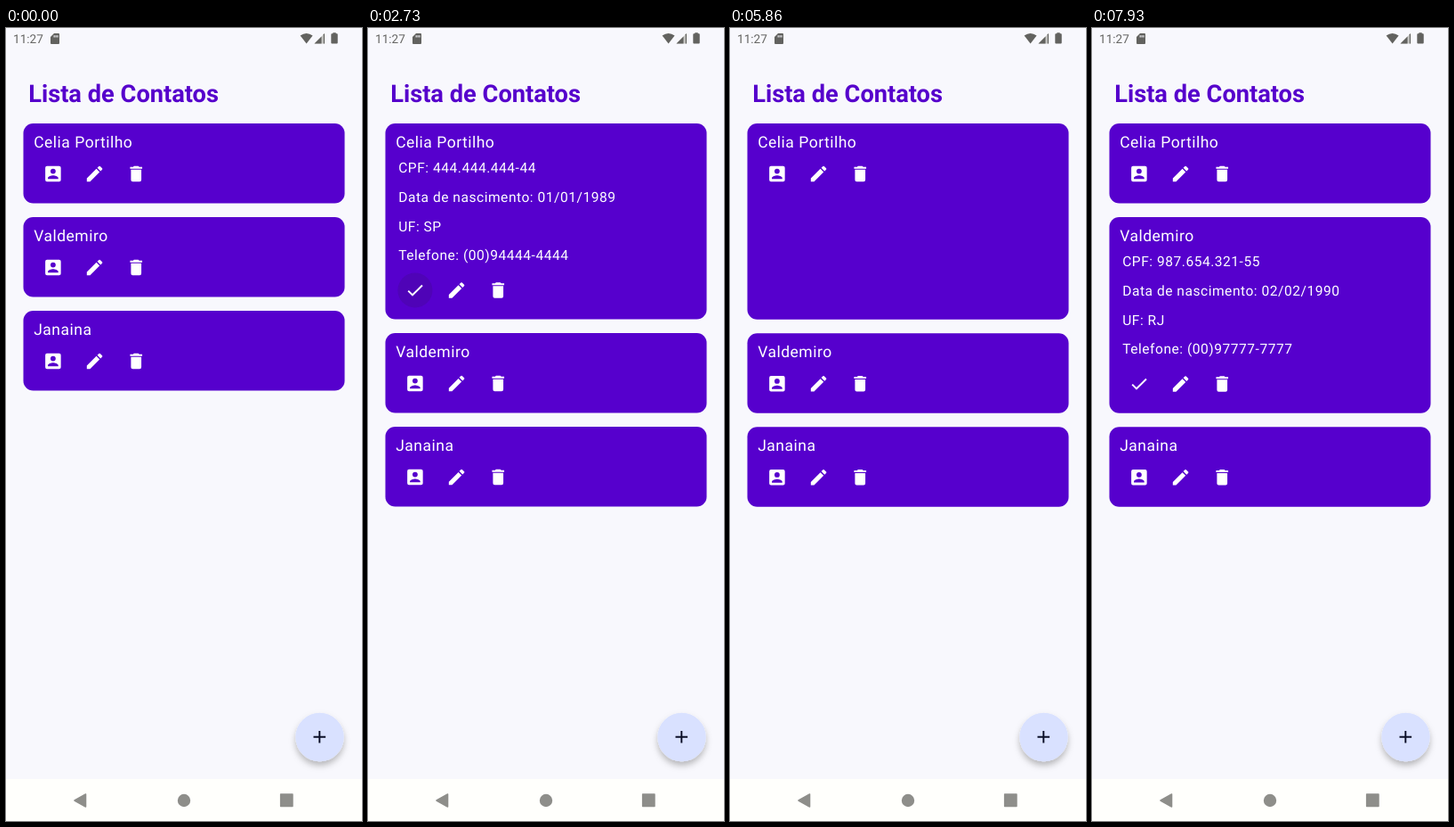
Write an HTML page that moves like this. It is 400 px wide and 889 px high and loops after 8000 ms.

```html
<!DOCTYPE html>
<html lang="pt-BR">
<head>
<meta charset="utf-8">
<title>Lista de Contatos</title>
<style>
  html, body { margin: 0; width: 100%; height: 100%; overflow: hidden; background: #f8f8fd; }
  svg { display: block; }
  #stage { width: 100vw; height: 100vh; }
  text { font-family: Roboto, "Noto Sans", sans-serif; white-space: pre; text-rendering: geometricPrecision; }
  .title { font-size: 27.22px; font-weight: 700; fill: #5600cc; }
  .clock { font-size: 13.6px; fill: #666664; }
  .name { font-size: 17.5px; letter-spacing: .5px; fill: #fff; }
  .info { font-size: 15.57px; letter-spacing: .52px; fill: #fff; }
  .card { fill: #5600cd; }
  .icon { fill: #fff; fill-rule: evenodd; }
  .ripple { fill: #1b1b1f; }
  .status { fill: #62625f; }
  .nav { fill: #8e8e8a; stroke: #8e8e8a; stroke-linejoin: round; }
</style>
</head>
<body>
<svg id="stage" viewBox="0 0 400 889" preserveAspectRatio="none">
  <defs>
    <filter id="shadow" x="-30%" y="-30%" width="160%" height="170%">
      <feDropShadow dx="0" dy="4.5" stdDeviation="3.5" flood-color="#000" flood-opacity=".26"/>
    </filter>
  </defs>
  <rect width="400" height="889" fill="#f8f8fd"/>
  <rect y="842" width="400" height="47" fill="#fffffc"/>

  <text class="clock" x="8" y="17">11:27</text>
  <g class="status">
    <path fill-rule="evenodd" d="M54 6h5q1 0 1 1v10q0 1-1 1h-8q-1 0-1-1v-7zM53.6 8.2v2.4h1.1V8.2zm1.9 0v2.4h1.1V8.2zm1.9 0v2.4h1.1V8.2z"/>
    <path d="M330.6 8.6Q337.5 3.2 344.6 8.6L337.6 17.4z"/>
    <path d="M358 6v11.5h-11.5z" fill="#c8c8c6"/>
    <path d="M354.5 9.5v8h-8z"/>
    <path d="M356.8 7.2L358 6v11.5h-1.2z"/>
    <path d="M367.3 6.3V5.2h3.4v1.1h1.1q.9 0 .9.9v9.4q0 .9-.9.9h-5.6q-.9 0-.9-.9V7.2q0-.9.9-.9z"/>
  </g>

  <text class="title" x="25.2" y="83">Lista de Contatos</text>
  <g id="list"></g>

  <circle cx="352.5" cy="795" r="27.2" fill="#d9e1ff" filter="url(#shadow)"/>
  <path d="M352.3 788v13.6M345.5 794.8h13.6" stroke="#0c1028" stroke-width="1.95"/>

  <g class="nav">
    <path d="M77 866L89.5 859v14z" stroke-width="1.6"/>
    <circle cx="200" cy="866" r="7.2" stroke-width="0"/>
    <rect x="308.6" y="859" width="13.4" height="13.6" stroke-width="1.4"/>
  </g>
</svg>

<script>
const LOOP = 8000, TOP = 107, GAP = 15.6, SHORT = 89.4, TALL = 219.7;
const ICON = 23.35, ICON_X = 52.9, ICON_STEP = 46.67;
const ICON_Y = 56.5, ICON_Y_OPEN = 187;
const INFO_Y = [55, 88, 121, 153];

const ICONS = {
  person: 'M5 3h14q2 0 2 2v14q0 2-2 2H5q-2 0-2-2V5q0-2 2-2zM15 9a3 3 0 1 0-6 0a3 3 0 1 0 6 0zM6 17c0-2 4-3.1 6-3.1s6 1.1 6 3.1v1H6z',
  check: 'M9 16.2L4.8 12l-1.4 1.4L9 19 21 7l-1.4-1.4z',
  edit: 'M3 17.25V21h3.75L17.8 9.95 14.05 6.2zM20.7 7.05q.7-.7 0-1.4l-2.35-2.35q-.7-.7-1.4 0l-1.85 1.8 3.75 3.75z',
  trash: 'M6 7h12v12q0 2-2 2H8q-2 0-2-2zM19 4h-3.5l-1-1h-5l-1 1H5v2h14z'
};

// press: ripple begins, swap: content changes, move: height spring begins
const CONTACTS = [
  { name: 'Celia Portilho',
    info: ['CPF: 444.444.444-44', 'Data de nascimento: 01/01/1989', 'UF: SP', 'Telefone: (00)94444-4444'],
    toggles: [{ press: 2300, swap: 2310, move: 2310, open: true },
              { press: 5890, swap: 5850, move: 5925, open: false }] },
  { name: 'Valdemiro',
    info: ['CPF: 987.654.321-55', 'Data de nascimento: 02/02/1990', 'UF: RJ', 'Telefone: (00)97777-7777'],
    toggles: [{ press: 7380, swap: 7390, move: 7390, open: true }] },
  { name: 'Janaina', info: [], toggles: [] }
];

function add(parent, tag, attrs, text) {
  const el = document.createElementNS('http://www.w3.org/2000/svg', tag);
  for (const key in attrs) el.setAttribute(key, attrs[key]);
  if (text) el.textContent = text;
  parent.appendChild(el);
  return el;
}

function addIcon(parent, kind, slot) {
  const x = ICON_X + slot * ICON_STEP - ICON / 2;
  return add(parent, 'path', {
    class: 'icon', d: ICONS[kind],
    transform: `translate(${x} ${-ICON / 2}) scale(${ICON / 24})`
  });
}

function buildCard(contact, i) {
  const root = add(document.getElementById('list'), 'g', {});
  const box = { x: 19.5, y: 0, width: 361, rx: 11 };
  const clip = add(add(root, 'clipPath', { id: 'clip' + i }), 'rect', box);
  const back = add(root, 'rect', { class: 'card', ...box });
  const body = add(root, 'g', { 'clip-path': `url(#clip${i})` });
  add(body, 'text', { class: 'name', x: 31.2, y: 27.2 }, contact.name);
  const info = add(body, 'g', {});
  contact.info.forEach((line, n) =>
    add(info, 'text', { class: 'info', x: 34.2, y: INFO_Y[n] }, line));
  const row = add(body, 'g', {});
  const ripple = add(row, 'circle', { class: 'ripple', cx: ICON_X, cy: 0, r: 0 });
  const person = addIcon(row, 'person', 0);
  const check = addIcon(row, 'check', 0);
  addIcon(row, 'edit', 1);
  addIcon(row, 'trash', 2);
  return { contact, root, clip, back, info, row, ripple, person, check };
}

// Critically damped spring, 0 to 1
function spring(ms) {
  if (ms <= 0) return 0;
  const u = ms * 0.02;
  return 1 - (1 + u) * Math.exp(-u);
}

const clamp = v => Math.max(0, Math.min(1, v));
const show = (el, on) => el.setAttribute('visibility', on ? 'inherit' : 'hidden');

function cardState(toggles, t) {
  let open = false, height = SHORT, radius = 0, alpha = 0;
  for (const g of toggles) {
    if (t >= g.swap) open = g.open;
    height += ((g.open ? TALL : SHORT) - height) * spring(t - g.move);
    const age = t - g.press;
    if (age >= 0 && age < 540) {
      radius = 8 + 11.5 * clamp(age / 225);
      alpha = 0.12 * clamp(age / 75) * clamp((540 - age) / 100);
    }
  }
  return { open, height, radius, alpha };
}

const cards = CONTACTS.map(buildCard);

function draw(t) {
  let y = TOP;
  for (const c of cards) {
    const s = cardState(c.contact.toggles, t);
    c.root.setAttribute('transform', `translate(0 ${y})`);
    c.clip.setAttribute('height', s.height);
    c.back.setAttribute('height', s.height);
    c.row.setAttribute('transform', `translate(0 ${s.open ? ICON_Y_OPEN : ICON_Y})`);
    c.ripple.setAttribute('r', s.radius);
    c.ripple.setAttribute('opacity', s.alpha);
    show(c.info, s.open);
    show(c.check, s.open);
    show(c.person, !s.open);
    y += s.height + GAP;
  }
}

const start = performance.now();
function frame() {
  draw((performance.now() - start) % LOOP);
  requestAnimationFrame(frame);
}
frame();
</script>
</body>
</html>
```
